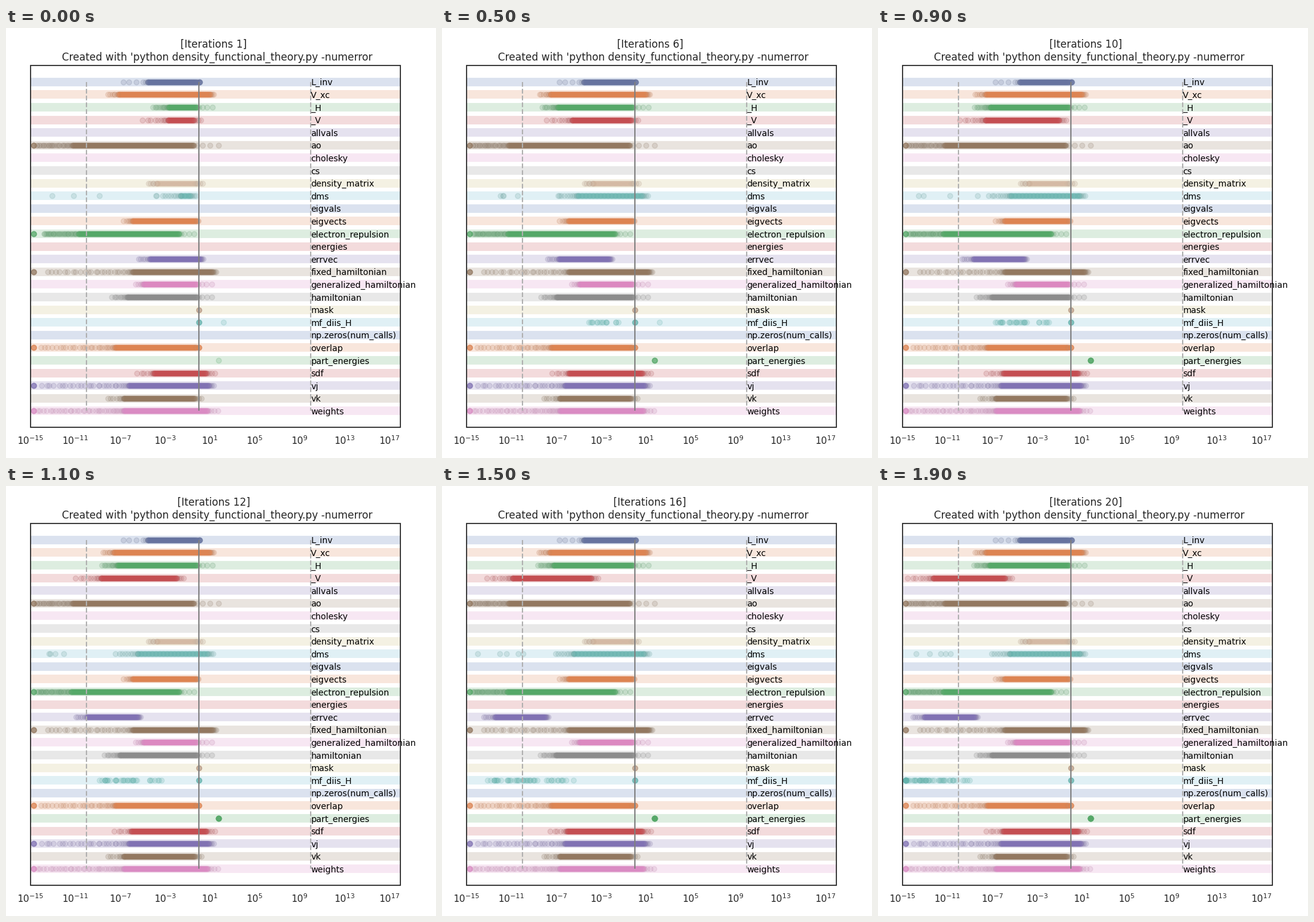
Write a matplotlib script that moves like this. It is 700x700 px and loops after 2 s.

```python
import numpy as np
import matplotlib.pyplot as plt
from matplotlib.animation import FuncAnimation
from matplotlib.colors import to_rgb
from matplotlib.patches import Rectangle

plt.rcParams["font.family"] = "DejaVu Sans"

FRAMES, INTERVAL = 20, 100
LEFT, TOP, BOTTOM = 40, 61, 650
FIRST, LAST = 87.85, 623.45
DECADE = 18.25
RIGHT = LEFT + 33 * DECADE
FLOOR, UNIT = 45, 314
DARK = "#262626"
TEAL = "#64B2AC"
DEEP = ["#4C72B0", "#DD8452", "#55A868", "#C44E52", "#8172B3",
        "#937860", "#DA8BC3", "#8C8C8C", "#CCB974", "#64B5CD"]
NAMES = """L_inv V_xc _H _V allvals ao cholesky cs density_matrix dms eigvals
eigvects electron_repulsion energies errvec fixed_hamiltonian
generalized_hamiltonian hamiltonian mask mf_diis_H np.zeros(num_calls) overlap
part_energies sdf vj vk weights""".split()
ROW_Y = dict(zip(NAMES, np.linspace(FIRST, LAST, len(NAMES))))
KEYS = (1, 6, 10, 16, 20)

fig = plt.figure(figsize=(7, 7), dpi=100, facecolor="white")
ax = fig.add_axes([0, 0, 1, 1])
ax.set_xlim(0, 700)
ax.set_ylim(700, 0)
ax.axis("off")


def decade_x(exponent):
    return LEFT + (exponent + 15) * DECADE


def settle(first, final):
    return lambda k: final + (first - final) * np.exp(-(k - 1) / 2)


def drift(*points):
    return lambda k: np.interp(k, KEYS, points)


def fixed(x):
    return x if callable(x) else lambda k: x


def greyed(color, part=0.3):
    return (1 - part) * np.array(to_rgb(color)) + part * 0.5


def markers(name, color, z=4):
    line, = ax.plot([], [], "o", ms=6, mew=1, color=color, alpha=0.2, zorder=z)
    return line, ROW_Y[name]


def place(artist, xs):
    line, y = artist
    line.set_data(xs, np.full(len(xs), y))


class Cloud:
    """A dense core of dots from start to end with thinning tails.

    tail and n: length and dot count on the left; right: length on the right;
    heavy: places where several dots coincide; strays: loose dots per step.
    """

    def __init__(self, name, start, end, tail, n=9, power=1.6, right=8,
                 heavy=(), strays=0, color=None, step=0.6):
        self.start, self.end = fixed(start), fixed(end)
        self.tail, self.right, self.power = tail, right, power
        self.step, self.strays = step, strays
        self.heavy = np.repeat(heavy, 6)
        rng = np.random.default_rng(NAMES.index(name))
        self.u = np.linspace(0, 1, n)
        self.u[1:-1] += rng.uniform(-0.4, 0.4, n - 2) / n
        color = color or DEEP[NAMES.index(name) % 10]
        self.fringe = markers(name, greyed(color), 3)
        self.body = markers(name, color)

    def update(self, k):
        a, b = self.start(k), self.end(k)
        left = a - self.tail * self.u ** self.power
        right = b + self.right * np.linspace(0, 1, 5) ** 1.5
        loose = np.random.default_rng(k).uniform(FLOOR, a - self.tail,
                                                 self.strays)
        place(self.fringe, np.concatenate([left, right, loose]))
        place(self.body, np.concatenate([np.arange(a, b, self.step),
                                         self.heavy]))


err_start = drift(234, 190, 155, 86, 75)
floor = (FLOOR,)

clouds = [
    Cloud("L_inv", 231, 310, 40, 8, 2.5, right=5, heavy=(315,),
          color="#66739F"),
    Cloud("V_xc", settle(184, 176), 332, 18, right=6),
    Cloud("_H", settle(265, 182), 311, 26, 14, right=25),
    Cloud("_V", drift(264, 212, 175, 115, 90), drift(306, 308, 295, 243, 207),
          42, 12, 2, right=11),
    Cloud("ao", 108, 306, 58, 30, 1, right=40, heavy=floor),
    Cloud("density_matrix", 246, 308, 14, 6, 1.2, right=12,
          color="#C9A58C", step=2),
    Cloud("dms", settle(285, 215), settle(300, 328), 30, 10, right=9,
          strays=5, color=TEAL, step=1.2),
    Cloud("eigvects", 206, 309, 15, 7, right=4),
    Cloud("electron_repulsion", settle(118, 106), 282, 56, 34, 1, right=24,
          heavy=floor),
    Cloud("errvec", err_start, lambda k: err_start(k) + 82, 18, 7, 1.3,
          right=5),
    Cloud("fixed_hamiltonian", 206, 336, 138, 28, 1.4, right=6, heavy=floor),
    Cloud("generalized_hamiltonian", 224, 310, 13, 6, right=25,
          color="#DC88C0"),
    Cloud("hamiltonian", settle(198, 186), 311, 26, 12, right=24),
    Cloud("overlap", 178, 308, 121, 30, 1.5, right=3, heavy=(FLOOR, UNIT)),
    Cloud("sdf", settle(241, 204), 326, 28, 9, 2, right=14),
    Cloud("vj", 200, 330, 142, 30, 1.4, right=8, heavy=floor),
    Cloud("vk", 192, 307, 26, 10, 1.8, right=11),
    Cloud("weights", 192, 328, 140, 38, 1.3, right=17, heavy=floor),
]

mask = markers("mask", "#A07860")
energies = markers("part_energies", DEEP[2])
diis = markers("mf_diis_H", TEAL)
diis_low = drift(312, 232, 183, 62, 8)
diis_high = drift(UNIT, 307, 300, 234, 155)
diis_u = np.random.default_rng(5).beta(1.5, 2, 3 * FRAMES)


def diis_dots(k):
    low, high = diis_low(k), diis_high(k)
    xs = low + (high - low) * diis_u[:3 * (k - 1)]
    strays = [354] if k < 8 else []
    return np.maximum(np.concatenate([xs, strays, [UNIT] * 6]), FLOOR)


for i, name in enumerate(NAMES):
    y = ROW_Y[name]
    ax.plot([LEFT, RIGHT], [y, y], lw=10, color=DEEP[i % 10], alpha=0.2,
            solid_capstyle="butt", zorder=1)
    ax.text(decade_x(10), y, name, size=10, color="black",
            va="center_baseline", zorder=8)

for exponent, style, shade in ((-10, "--", "#B0B0B0"), (0, "-", "#808080"),
                               (10, "--", "#B0B0B0")):
    x = decade_x(exponent)
    ax.plot([x, x], [FIRST, LAST], style, lw=1.5, color=shade,
            solid_capstyle="butt", zorder=6)

ax.add_patch(Rectangle((LEFT, TOP), RIGHT - LEFT, BOTTOM - TOP, fill=False,
                       ec=DARK, lw=1.25, zorder=7))
for exponent in range(-15, 18, 4):
    ax.text(decade_x(exponent), 678, r"$\mathdefault{10^{%d}}$" % exponent,
            size=11, color=DARK, ha="center", va="baseline")

title = ax.text(338.5, 32, "", size=12, color=DARK, ha="center", va="baseline")
ax.text(343.8, 53, "Created with 'python density_functional_theory.py -numerror",
        size=12, color=DARK, ha="center", va="baseline")


def draw(frame):
    k = frame + 1
    title.set_text(f"[Iterations {k}]")
    for cloud in clouds:
        cloud.update(k)
    place(mask, [UNIT] * 3)
    place(energies, [346] * k)
    place(diis, diis_dots(k))
    return []


anim = FuncAnimation(fig, draw, frames=FRAMES, interval=INTERVAL,
                     init_func=lambda: draw(0), repeat=True, repeat_delay=0)
plt.show()
```
